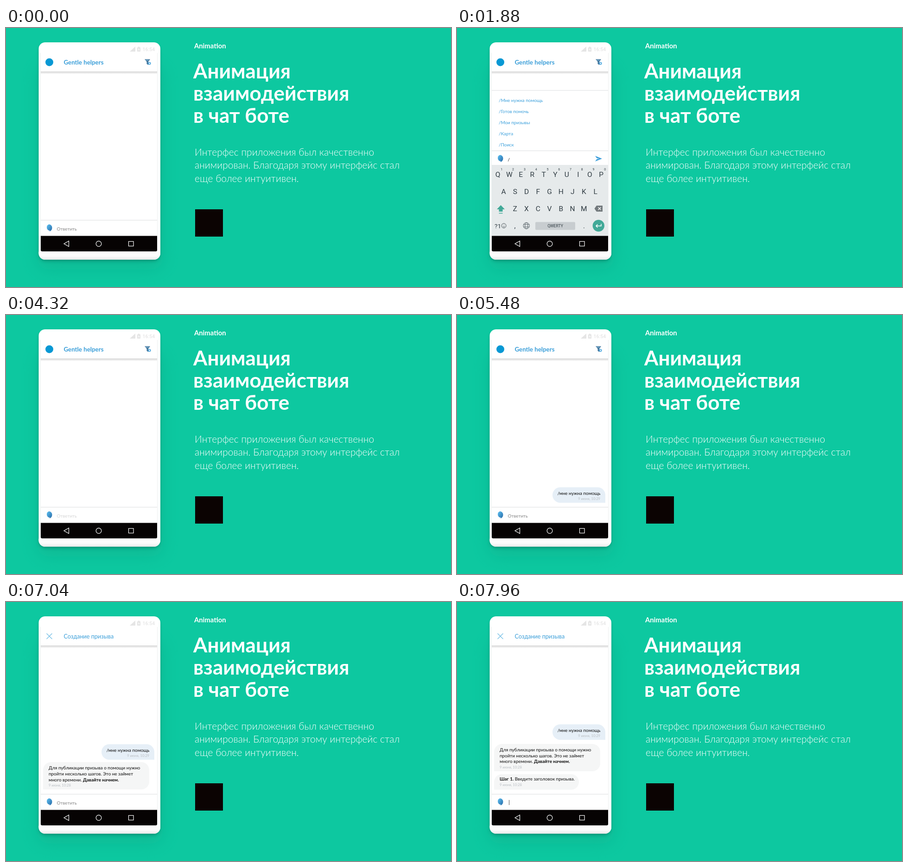
An HTML page for the animation above (8 s loop, 960 px wide and 560 px high).

```html
<!DOCTYPE html>
<html lang="ru">
<head>
<meta charset="utf-8">
<title>Chat bot animation</title>
<style>
html, body { margin: 0; width: 100%; height: 100%; overflow: hidden; background: #0dc8a0; }
svg { display: block; width: 960px; height: 560px; }
text { font-family: Lato, "Open Sans", sans-serif; white-space: pre; }
.kb text { font-family: Roboto, sans-serif; fill: #2f3b42; text-anchor: middle; }
.b { font-weight: 700; }
.time { font-size: 7.6px; fill: #b9bec3; }
.msg { font-size: 9.9px; fill: #0c0c0c; }
.cmd { font-size: 9.9px; fill: #3a9fdb; }
.end { text-anchor: end; }
.line { stroke: #dcdfe0; }
</style>
</head>
<body>
<svg viewBox="0 0 960 560" xmlns="http://www.w3.org/2000/svg">
  <defs>
    <filter id="far" x="-40%" y="-30%" width="180%" height="160%"><feGaussianBlur stdDeviation="17"/></filter>
    <filter id="near" x="-20%" y="-20%" width="140%" height="140%"><feGaussianBlur stdDeviation="3"/></filter>
    <linearGradient id="drop" x2="0" y2="1"><stop stop-color="#000" stop-opacity=".17"/><stop offset="1" stop-color="#000" stop-opacity="0"/></linearGradient>
    <linearGradient id="base" x2="0" y2="1"><stop stop-color="#fff"/><stop offset=".6" stop-color="#fafafa"/><stop offset="1" stop-color="#e4e7e7"/></linearGradient>
    <linearGradient id="blue" x2="1" y2="1"><stop offset=".15" stop-color="#55b5e8"/><stop offset="1" stop-color="#2667a4"/></linearGradient>
    <clipPath id="screen"><rect x="75" y="94" width="251" height="357"/></clipPath>
  </defs>

  <rect width="960" height="560" fill="#0dc8a0"/>
  <rect x="68" y="82" width="270" height="440" rx="24" fill="#0aa886" opacity=".42" filter="url(#far)"/>
  <rect x="71" y="36" width="261" height="468" rx="14" fill="#056b55" opacity=".5" filter="url(#near)"/>
  <rect x="70.5" y="31" width="262.5" height="470" rx="14" fill="#fff"/>
  <path d="M70.5 484H333V487A14 14 0 0 1 319 501H84.500A14 14 0 0 1 70.500 487Z" fill="url(#base)"/>
  <path d="M74.500 54V483M326.500 54V483" stroke="#eef0f0"/>

  <g fill="#e5e5e5">
    <path d="M267 51L279 40V51ZM283 42h2v-1.500h3V42h2v9h-7Z"/>
    <path d="M287 43.500l-2 3.500h1.500v3l2-4H287Z" fill="#fff"/>
    <text x="294.500" y="50" font-size="10.500" font-weight="500" style="font-family:Roboto,sans-serif">16:54</text>
  </g>

  <g clip-path="url(#screen)">
    <g id="chat"></g>
    <g id="panel">
      <rect x="75" width="251" height="320" fill="#fff"/>
      <path d="M75 0H326" class="line"/>
      <g id="pick">
        <rect x="75" y="9" width="251" height="25" fill="#f5fdfe"/>
        <path d="M301.500 13.500l11 11m0-11l-11 11" stroke="#cfd3d4" stroke-width="1.200"/>
      </g>
    </g>
    <g id="bar">
      <rect x="75" width="251" height="200" fill="#fff"/>
      <path d="M75 .5H326" class="line"/>
      <path d="M92.500 9.500a7 7 0 0 1 7 7.300c0 4-1.800 6.700-5.500 8.200l.2-2a7 7 0 0 1-1.700-13.500Z" fill="url(#blue)"/>
      <text id="hint" x="109.500" y="22.500" font-size="9.900" fill="#858585">Ответить</text>
      <text id="typed" x="109.500" y="22.500" class="msg"></text>
      <path id="caret" d="M112.500 13V24" stroke="#555"/>
      <path id="send" d="M-7-6L8 0L-7 6L-3.500 1L2 0L-3.500-1Z" fill="#3d9fdb"/>
    </g>
    <g id="keys" class="kb"></g>
  </g>

  <rect x="75" y="94" width="251" height="6" fill="url(#drop)"/>
  <rect x="75" y="54" width="251" height="40" fill="#fff"/>
  <g id="home">
    <circle cx="93.500" cy="74" r="8.500" fill="#0798d4"/>
    <text x="124.500" y="79" class="b" font-size="13.300" fill="#3c9fd9">Gentle helpers</text>
    <path d="M299 67.500H311L307 73V80L303.500 77.500V73Z" fill="#47799f"/>
    <path d="M301 69.500H308" stroke="#8fc4e4"/>
    <circle cx="309.500" cy="76.500" r="2.200" fill="#fff" stroke="#3d9fdb" stroke-width="1.600"/>
  </g>
  <g id="form">
    <path d="M87.500 68l12 12m0-12l-12 12" stroke="#77c0e6" stroke-width="1.300"/>
    <text x="124.500" y="79" font-size="12.600" fill="#3c9fd9">Создание призыва</text>
  </g>

  <path d="M75 449.500H326V480a3 3 0 0 1-3 3H78a3 3 0 0 1-3-3Z" fill="#060303"/>
  <g fill="none" stroke="#fff" stroke-width="1.200">
    <path d="M125 466.500L135.500 460.500V472.500Z"/><circle cx="200" cy="466.500" r="5.800"/><rect x="264.500" y="461.500" width="10.500" height="10"/>
  </g>

  <g fill="#fff">
    <text x="406" y="44" class="b" font-size="14.800">Animation</text>
    <g class="b" font-size="44">
      <text x="404" y="109">Анимация</text>
      <text x="404" y="157">взаимодействия</text>
      <text x="404" y="205">в чат боте</text>
    </g>
    <g font-weight="300" font-size="21">
      <text x="407" y="275.500">Интерфес приложения был качественно</text>
      <text x="407" y="304">анимирован. Благодаря этому интерфейс стал</text>
      <text x="407" y="332.500">еще более интуитивен.</text>
    </g>
  </g>
  <rect x="408" y="392" width="60" height="59" fill="#0b0302"/>
</svg>

<script>
const LOOP = 8000;
const NS = 'http://www.w3.org/2000/svg';
const $ = id => document.getElementById(id);

function add(parent, tag, attrs, text) {
  const el = document.createElementNS(NS, tag);
  for (const k in attrs) el.setAttribute(k, attrs[k]);
  if (text) el.textContent = text;
  return parent.appendChild(el);
}

// Keyboard, drawn from its top edge
const keys = $('keys');
add(keys, 'rect', { x: 75, width: 251, height: 160, fill: '#e6eaeb' });
[['QWERTYUIOP', 88, 25.5], ['ASDFGHJKL', 100.5, 62.5], ['ZXCVBNM', 125.2, 100]].forEach(([row, x, y], r) => {
  [...row].forEach((ch, i) => {
    const cx = x + i * 24.78;
    add(keys, 'text', { x: cx, y, 'font-size': 15.5 }, ch);
    if (!r) add(keys, 'text', { x: cx + 8.3, y: 12.3, 'font-size': 7 }, String((i + 1) % 10));
  });
});
const shape = (d, fill, stroke = 'none', w = 1.2) =>
  add(keys, 'path', { d, fill, stroke, 'stroke-width': w });
shape('M94.500 87L103 96H98.500V101H90.500V96H86Z', '#42a998');
shape('M90.500 104.500H98.500', 'none', '#42a998', 1.5);
shape('M296.500 94.500L301 88H314V101H301Z', '#737a7d');
shape('M304.500 91.500l6 6m0-6l-6 6', 'none', '#fff', 1.4);
add(keys, 'text', { x: 88, y: 136.5, 'font-size': 13.5 }, '?1');
add(keys, 'circle', { cx: 101, cy: 131.5, r: 5, fill: 'none', stroke: '#4c565b' });
shape('M98.500 133q2.500 2.500 5 0M99 130h1M102 130h1', 'none', '#4c565b', 1);
add(keys, 'text', { x: 125, y: 136.5, 'font-size': 15 }, ',');
add(keys, 'circle', { cx: 149.7, cy: 131.5, r: 6.7, fill: 'none', stroke: '#59646a' });
add(keys, 'ellipse', { cx: 149.7, cy: 131.5, rx: 3, ry: 6.7, fill: 'none', stroke: '#59646a' });
shape('M143.500 129H156M143.500 134H156', 'none', '#59646a', 1);
add(keys, 'rect', { x: 169, y: 123.5, width: 86, height: 17, rx: 2, fill: '#c8cdd0' });
add(keys, 'text', { x: 212, y: 135, 'font-size': 8.6 }, 'QWERTY');
add(keys, 'text', { x: 274, y: 136.5, 'font-size': 15 }, '.');
add(keys, 'circle', { cx: 305.3, cy: 131.5, r: 12.7, fill: '#42a998' });
shape('M311 127.500V132H300M303.500 128.500L300 132L303.500 135.500', 'none', '#fff', 1.5);

// Command list
const items = ['Мне нужна помощь', 'Готов помочь', 'Мои призывы', 'Карта', 'Поиск'].map((s, i) =>
  add($('panel'), 'text', { x: 90, y: 25.5 + i * 23.9, class: 'cmd' }, '/' + s));

// Messages; the square corner sits on the sender's side
function bubble(x, w, h, mine) {
  const g = add($('chat'), 'g', {}), r = Math.min(17, h / 2);
  const d = mine
    ? `M${x + r} 0H${x + w - r}a${r} ${r} 0 0 1 ${r} ${r}V${h}H${x + r}a${r} ${r} 0 0 1 0 ${-2 * r}Z`
    : `M${x + r} 0H${x + w - r}a${r} ${r} 0 0 1 ${r} ${r}V${h - r}a${r} ${r} 0 0 1 ${-r} ${r}H${x}V${r}a${r} ${r} 0 0 1 ${r} ${-r}Z`;
  add(g, 'path', { d, fill: mine ? '#e6eff7' : '#f5f6f6' });
  return g;
}
const ask = bubble(206, 114, 33.5, true);
add(ask, 'text', { x: 309.5, y: 16, class: 'msg end' }, '/мне нужна помощь');
add(ask, 'text', { x: 309, y: 27.5, class: 'time end' }, '9 июня, 10:29');

const intro = bubble(80, 229, 59, false);
['Для публикации призыва о помощи нужно', 'пройти несколько шагов. Это не займет', 'много времени. '].forEach((s, i) => {
  const line = add(intro, 'text', { x: 92, y: 16 + i * 12.7, class: 'msg' }, s);
  if (i === 2) add(line, 'tspan', { class: 'b' }, 'Давайте начнем.');
});
add(intro, 'text', { x: 92, y: 53, class: 'time' }, '9 июня, 10:28');

const step = bubble(80, 183, 33.5, false);
const lead = add(step, 'text', { x: 92, y: 14, class: 'msg' });
add(lead, 'tspan', { class: 'b' }, 'Шаг 1.');
add(lead, 'tspan', {}, ' Введите заголовок призыва.');
add(step, 'text', { x: 92, y: 26, class: 'time' }, '9 июня, 10:28');

// Timing
const span = (t, a, b) => Math.min(1, Math.max(0, (t - a) / (b - a)));
const out = p => 1 - (1 - p) ** 3;
const both = p => p * p * (3 - 2 * p);
const mix = (a, b, p) => a + (b - a) * p;
const move = (el, y, x = 0) => el.setAttribute('transform', `translate(${x} ${y})`);
const fade = (el, v) => el.setAttribute('opacity', v);

const PHRASE = '/мне нужна помощь';

function draw(t) {
  const close = both(span(t, 3720, 4160));
  const rise = out(span(t, 700, 1434));
  move(keys, mix(mix(450, 296, rise), 450, close));

  const lift = mix(415, 261, Math.sin(span(t, 700, 1160) * Math.PI / 2));
  const settle = 4 * both(span(t, 1160, 1434));
  const barY = mix(lift + settle, 415, close);
  move($('bar'), barY);

  const panelY = mix(265, 132, out(span(t, 1480, 2038)));
  move($('panel'), mix(panelY, 415, both(span(t, 3680, 4080))));
  fade($('panel'), t > 1480 && t < 4080 ? 1 : 0);
  items.forEach((el, i) => {
    const gone = i === 2 ? 2240 : 2170;
    fade(el, i ? 1 - span(t, gone, gone + 120) : mix(1, .85, span(t, 3360, 3600)));
  });
  items[0].setAttribute('font-style', t >= 3360 ? 'italic' : 'normal');
  fade($('pick'), span(t, 3360, 3600));

  const count = t < 1520 || t >= 3760 ? 0 : 1 + Math.max(0, Math.floor((t - 2100) / 68) + 1);
  $('typed').textContent = PHRASE.slice(0, count);

  const focus = t >= 360 && t < 4160 || t >= 7760;
  fade($('hint'), t < 360 ? 1 : focus ? 0 : span(t, 4240, 4480));
  fade($('caret'), t >= 360 && t < 900 || t >= 7760 ? 1 : 0);

  const slide = t < 7000 ? span(t, 440, 840) : span(t, 7860, 8260);
  move($('send'), 17.5, mix(226, 305, both(slide)));
  fade($('send'), (t < 7000 ? slide : slide * .35) * (1 - span(t, 3760, 4000)));

  const first = out(span(t, 4800, 5280));
  const second = out(span(t, 6240, 6760));
  const third = out(span(t, 7100, 7600));
  move(ask, mix(418, 372.5, first) - 65 * second - 43 * third);
  fade(ask, first);
  move(intro, mix(420, 346.3, second) - 39.3 * third);
  fade(intro, second);
  move(step, mix(418, 372.3, third));
  fade(step, third);

  const swap = span(t, 6080, 6320);
  fade($('home'), 1 - swap);
  fade($('form'), swap);
}

const start = performance.now();
function tick() {
  draw((performance.now() - start) % LOOP);
  requestAnimationFrame(tick);
}
draw(0);
requestAnimationFrame(tick);
</script>
</body>
</html>
```
